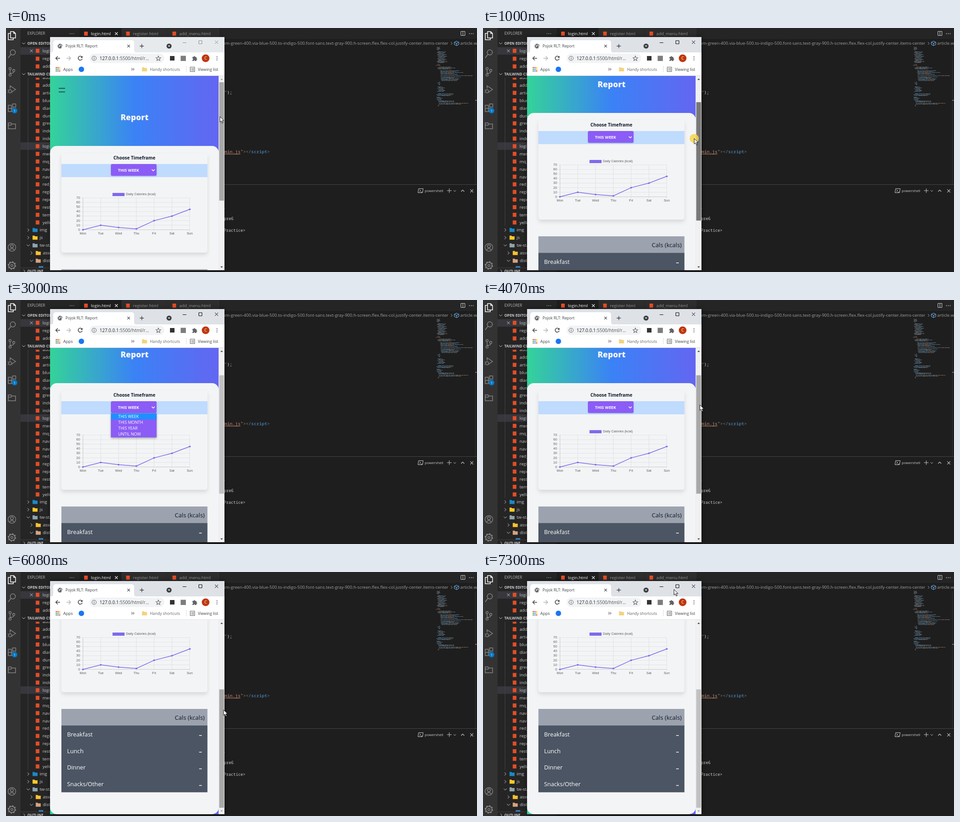
Write an HTML page that moves like this. It is 1037 px wide and 540 px high and loops after 8000 ms.

```html
<!DOCTYPE html>
<html lang="en">
<head>
<meta charset="utf-8">
<title>Report page</title>
<style>
html, body { margin: 0; width: 100%; height: 100%; overflow: hidden; background: #1e1e1e; }
svg { display: block; width: 100%; height: 100%; font-family: "Open Sans", "Noto Sans", sans-serif; }
text { white-space: pre; }
.mono { font-family: "Noto Sans Mono", "DejaVu Sans Mono", monospace; }
.chart { font-family: "Liberation Sans", Arial, sans-serif; }
.card { filter: drop-shadow(0 5px 4px rgba(0,0,0,.11)); }
.btn { filter: drop-shadow(0 1px 1px rgba(0,0,0,.18)); }
.menu { filter: drop-shadow(0 2px 2px rgba(0,0,0,.35)); }
</style>
</head>
<body>
<svg id="stage" viewBox="0 0 1037 540" xmlns="http://www.w3.org/2000/svg"></svg>
<script>
const stage = document.getElementById('stage');
const esc = s => s.replace(/&/g, '&amp;').replace(/</g, '&lt;').replace(/>/g, '&gt;');
const rect = (x, y, w, h, fill, more = '') =>
  `<rect x="${x}" y="${y}" width="${w}" height="${h}" fill="${fill}" ${more}/>`;
const circle = (x, y, r, fill, more = '') => `<circle cx="${x}" cy="${y}" r="${r}" fill="${fill}" ${more}/>`;
const line = (d, stroke, width = 1, more = '') =>
  `<path d="${d}" fill="none" stroke="${stroke}" stroke-width="${width}" ${more}/>`;
// y is the vertical middle of the capitals
const text = (x, y, s, size, fill, more = '') =>
  `<text x="${x}" y="${y + size * .36}" font-size="${size}" fill="${fill}" ${more}>${esc(s)}</text>`;
const group = (body, more = '') => `<g ${more}>${body}</g>`;
const cross = (x, y, r, color, w = 1) =>
  line(`M${x - r} ${y - r}l${2 * r} ${2 * r}m0 ${-2 * r}l${-2 * r} ${2 * r}`, color, w);
const chevron = (x, y, open, color, r = 3.4) => line(open
  ? `M${x - r} ${y - r / 2}l${r} ${r}l${r} ${-r}`
  : `M${x - r / 2} ${y - r}l${r} ${r}l${-r} ${r}`, color);
const dots = (x, y, dx, dy, color, r = 1) =>
  [-1, 0, 1].map(i => circle(x + i * dx, y + i * dy, r, color)).join('');
const bold = 'font-weight="700"', end = 'text-anchor="end"', mid = 'text-anchor="middle"';

function activityBar() {
  const g = '#858585';
  return rect(0, 0, 32, 540, '#333333') +
    line('M10 8h7l4 4v10H10zM17 8v4h4M10 12H5v14h11v-4', '#fff', 1.5) +
    circle(15, 54, 5.7, 'none', `stroke="${g}" stroke-width="1.5"`) + line('M11 58L5 66', g, 1.6) +
    [[9, 90], [9, 104], [17, 94]].map(p => circle(p[0], p[1], 2.5, 'none', `stroke="${g}" stroke-width="1.3"`)).join('') +
    line('M9 92.5v9M17 96.5q0 4-8 4', g, 1.4) +
    line('M9 134v-6l12 8-9 6', g, 1.5) + circle(9, 140, 3.5, 'none', `stroke="${g}" stroke-width="1.4"`) +
    line('M3.5 137h2M3.5 143l2-1.5M14.5 143l-2-1.5', g) +
    line('M5 171h7v14H5zM5 178h14v7H12M14.5 168h7v7h-7z', g, 1.4) +
    circle(19, 183, 6, '#007acc') + text(19, 183, '1', 7.5, '#fff', mid) +
    line('M5 223v-13h6l2 2.5h8V223zM5 215h6l2-2.5', g, 1.5) +
    circle(13, 485.5, 8.5, 'none', `stroke="${g}" stroke-width="1.4"`) +
    circle(13, 483, 3.2, 'none', `stroke="${g}" stroke-width="1.4"`) + line('M7.5 492q5.5-8 11 0', g, 1.4) +
    circle(13, 525.5, 6.8, 'none', `stroke="${g}" stroke-width="1.8"`) +
    circle(13, 525.5, 8.2, 'none', `stroke="${g}" stroke-width="2" stroke-dasharray="3.2 3.24"`) +
    circle(13, 525.5, 2.4, 'none', `stroke="${g}" stroke-width="1.4"`);
}

const fileIcon = (x, y) => rect(x - 4, y - 4.5, 8, 9, '#e44d26');
const folder = (x, y, color) => `<path d="M${x - 5.5} ${y - 4.5}h4l1.5 1.5h5.5v7.5h-11z" fill="${color}"/>`;

function sidebar() {
  const c = '#cccccc', step = 16.87;
  const row = (y, name) => fileIcon(69.5, y) + text(80.5, y, name, 9.5, c);
  const files = ['add_food', 'add_menu', 'article', 'blue', 'diary', 'dummy', 'green', 'index', 'index2', 'login', 'menu',
    'mq_test', 'navbar', 'navbar2', 'red_box', 'register', 'report', 'restaurant', 'template', 'yellow'];
  const dirs = [[447, 0, 0, '#1e88c8', 'img'], [464, 0, 0, '#ffca28', 'js'], [481, 0, 1, '#90a4ae', 'tw-starter'],
    [498, 7, 0, '#fbc02d', 'assets'], [515, 7, 1, '#d7a27c', 'dist']];
  return rect(32, 0, 130, 540, '#252526') +
    text(47, 12, 'EXPLORER', 8.1, '#bbbbbb') + dots(145, 12.5, 4, 0, c, .8) +
    rect(32, 42.5, 130, 16.5, '#37373d') + rect(32, 253, 130, 16.5, '#37373d') +
    files.map((f, i) => row(109.8 + i * step, f + '.html')).join('') +
    line('M48.5 110V438', '#454545') +
    rect(32, 94, 130, 16, '#252526') +
    chevron(39, 34, true, c) + text(47, 34, 'OPEN EDITORS', 8, c, bold) +
    cross(56, 50.5, 3, c) + row(50.5, 'login.html') + row(68, 'register.html') + row(85, 'add_menu.html') +
    chevron(39, 102, true, c) + text(47, 102, 'TAILWIND CSS', 8, c, bold) +
    dirs.map(([y, dx, open, color, name]) => chevron(49 + dx, y, open, c) +
      folder(64 + dx, y, color) + text(74 + dx, y, name, 9.5, c)).join('') +
    rect(72, 527, 10, 4, '#2f7fc0') +
    rect(32, 530.5, 130, 10, '#252526') + rect(32, 530.5, 130, 1, '#454545') +
    chevron(40, 538, false, c) + text(47, 538.5, 'OUTLINE', 8, c, bold);
}

function minimap() {
  let seed = 11, out = '';
  const rnd = () => (seed = seed * 16807 % 2147483647) / 2147483647;
  const tones = ['#456f90', '#788f9c', '#8d6a56', '#666f78', '#4f8096'];
  const blocks = [[42, 50, 948, 9], [52, 77, 949, 23], [80, 84, 947, 10], [86, 92, 950, 46], [94, 104, 954, 54],
    [105, 107, 955, 76], [108, 118, 957, 46], [119, 126, 950, 8], [130, 141, 949, 20], [145, 150, 948, 38],
    [153, 160, 948, 14], [161, 165, 949, 50], [166, 169, 950, 83], [170, 174, 948, 6]];
  for (const [top, bottom, left, span] of blocks)
    for (let y = top; y < bottom; y += 2) {
      let x = left + Math.floor(rnd() * 3) * 1.5;
      const stop = Math.min(1032, left + span * (.6 + .4 * rnd()));
      while (x < stop) {
        const w = Math.min(stop - x, 2 + rnd() * 8);
        out += rect(x.toFixed(1), y, w.toFixed(1), 1, tones[Math.floor(rnd() * 5)]);
        x += w + .8;
      }
    }
  return out;
}

function editor() {
  const c = '#cccccc', grey = '#a0a0a0';
  const tab = (x, w, name, on) => rect(x, 0, w, 24, on ? '#1e1e1e' : '#2d2d2d') + fileIcon(x + 14, 12.5) +
    text(x + 25, 12.5, name, 9.4, on ? '#fff' : '#969696');
  const span = (s, fill) => `<tspan fill="${fill}">${esc(s)}</tspan>`;
  return rect(162, 0, 875, 540, '#1e1e1e') + rect(162, 0, 875, 24, '#252526') +
    tab(162, 92, 'login.html', true) + cross(243, 12.5, 3.2, '#fff', 1.2) +
    tab(254.5, 101.5, 'register.html') + tab(356.5, 113.5, 'add_menu.html') +
    line('M1001.5 7.5h9v9h-9zM1006 7.5v9', c) + dots(1024.5, 12.5, 4, 0, c, .9) +
    text(974, 34, 'from-green-400.via-blue-500.to-indigo-500.font-sans.text-gray-900.h-screen.flex.flex-col.justify-center.items-center', 9.5, grey, end) +
    chevron(981, 34, false, grey, 3) +
    line('M987 31.5l5-2.5 5 2.5v5l-5 2.5-5-2.5zM987 31.5l5 2.5 5-2.5M992 34v5', '#75beff') +
    text(1000, 34, 'article.w-full', 9.5, grey) +
    `<g class="mono" font-size="9.8"><text x="480.5" y="146">${span('"', '#ce9178') + span(');', '#d4d4d4')}</text>` +
    `<text x="481" y="276.5">${span('min.js"', '#ce9178') + span('></', '#808080') + span('script', '#569cd6') + span('>', '#808080')}</text></g>` +
    rect(481, 278.5, 35, 1, '#ce9178') +
    minimap() + rect(1033, 43, 1, 303, '#333') + rect(1033, 159.5, 4, 1.2, '#a0a0a0') +
    rect(162, 346, 875, 1, '#454545') +
    line('M908.5 355.5h10l-1.5 9h-10zM910.5 357.5l2.5 2.5-3 2.5M913.5 363h3', c) +
    text(922, 360.5, 'powershell', 8, c) + line('M971 360h10M976 355v10', c) + chevron(988, 360.5, true, c, 2.6) +
    line('M1002 362l3.5-3.5 3.5 3.5', c, 1.2) + cross(1025.5, 360.5, 3.3, c, 1.1) +
    group(text(483, 399, '-', 8.8, c, end) + text(501, 421.5, 'pre6', 8.8, c, end) +
      text(527, 448, 'Practice>', 8.8, c, end), 'class="mono"');
}

function browser() {
  const c = '#5f6368', ink = '#3c4043';
  const apps = ['#ea4335', '#ea4335', '#fbbc04', '#34a853', '#4285f4', '#fbbc04', '#34a853', '#4285f4', '#ea4335'];
  return rect(97, 20, 384, 516, '#000', 'id="shadow" style="filter:blur(5px)"') +
    rect(97, 20, 384, 516, '#fff') + rect(97, 20, 384, 34, '#dee1e6', 'id="strip"') +
    '<path d="M99 54q5 0 5-5V33q0-6 6-6h166q6 0 6 6v16q0 5 5 5z" fill="#fff"/>' +
    circle(119, 40, 5.3, c) + line('M115 37.5q3 0 3.5 2t-3 2M121 36q-1 2 .5 3t2 2-2 2.5', '#fff', 1.2) +
    text(131, 40, 'Pojok RLT: Report', 8.6, ink) + cross(270, 40, 2.8, ink, 1.2) +
    line('M294.5 40h9M299 35.5v9', ink, 1.3) + circle(359, 40, 5.6, ink) + '<path d="M356.5 38.8h5l-2.5 3z" fill="#fff"/>' +
    group('<path d="M389 32.5h8M424.5 28h7v7h-7zM460 28l7 7m0-7l-7 7"/>', 'id="controls" fill="none" stroke="#000"') +
    line('M119 67h-9.5M114 62.5l-4.5 4.5 4.5 4.5', ink, 1.4) +
    line('M133 67h9.5M138 62.5l4.5 4.5-4.5 4.5', '#b3b5b8', 1.4) +
    line('M167 64a4.5 4.5 0 1 0 .8 4', ink, 1.5) + `<path d="M168.5 61.5v4.5h-4.5z" fill="${ink}"/>` +
    rect(184, 56.5, 164.5, 21, '#f1f3f4', 'rx="10.5"') +
    circle(194, 67, 4.8, 'none', `stroke="${c}"`) + rect(193.4, 66, 1.2, 3.5, c) + rect(193.4, 64, 1.2, 1.2, c) +
    `<text x="206" y="70.6" font-size="10" fill="#202124">127.0.0.1<tspan fill="#4d5156">:5500/html/r...</tspan></text>` +
    line('M335.5 62l1.5 3.5 3.7.3-2.8 2.5.9 3.7-3.3-2-3.3 2 .9-3.7-2.8-2.5 3.7-.3z', c, 1.1) +
    rect(361, 62, 10, 10, '#333') + rect(384.5, 61.5, 11.5, 11.5, '#7d7d7d') +
    `<path d="M410.5 64h2.5a1.7 1.7 0 0 1 3.4 0h2.8v3a1.7 1.7 0 0 1 0 3.4v2.6h-3a1.5 1.5 0 0 0-3 0h-2.7v-2.8a1.5 1.5 0 0 0 0-3z" fill="${c}"/>` +
    circle(439.5, 67, 8.5, '#bf360c') + text(439.5, 67, 'C', 9, '#fff', mid) + dots(464.5, 67, 0, 3.7, c, 1.1) +
    apps.map((a, i) => rect(109.5 + i % 3 * 3.7, 86.5 + Math.floor(i / 3) * 3.7, 2.5, 2.5, a)).join('') +
    text(126, 91.5, 'Apps', 9, ink) + circle(166, 91.5, 6, '#1877f2') +
    line('M276 88.5l2.5 2.7-2.5 2.7M279.5 88.5l2.5 2.7-2.5 2.7', c, 1.1) +
    folder(305, 91.5, '#f3d27c') + text(317, 91.5, 'Handy shortcuts', 8.65, c) +
    rect(396.5, 84, 1, 14, '#dadce0') +
    line('M405.5 86.5h10v10h-10zM407 89.5h1.5M409.5 89.5h4.5M407 91.7h1.5M409.5 91.7h4.5M407 94h1.5M409.5 94h4.5', c) +
    text(422.5, 91.5, 'Viewing list', 8.65, ink) + rect(97, 105, 384, 1, '#dcdfe3');
}

function chart() {
  const purple = '#8069ec', px = i => 169.5 + i * 39.17, py = v => 446.5 - v * 1.007;
  const days = ['Mon', 'Tue', 'Wed', 'Thu', 'Fri', 'Sat', 'Sun'], kcal = [0, 10, 5, 2, 20, 30, 45];
  const label = (x, y, s, more = '') => `<text transform="translate(${x} ${y + 2.2}) scale(1 .85)" ${more}>${s}</text>`;
  let grid = '', labels = '';
  for (let v = 0; v <= 70; v += 10) {
    grid += line(`M165.5 ${py(v)}H404.5`, v ? '#e1e2e5' : '#c4c5c8', .9);
    labels += label(163, py(v), v, end);
  }
  days.forEach((d, i) => {
    grid += line(`M${px(i)} ${py(70)}V450`, i ? '#dedfe2' : '#c4c5c8', .9);
    labels += label(px(i), 455, d, mid);
  });
  return grid + rect(234.5, 365, 26.5, 7, purple) +
    group(labels + label(264, 368, 'Daily Calories (kcal)'), 'class="chart" font-size="7.4" fill="#5c5c5c"') +
    line('M' + kcal.map((v, i) => `${px(i)} ${py(v)}`).join('L'), purple, 1.5) +
    kcal.map((v, i) => `<ellipse cx="${px(i)}" cy="${py(v)}" rx="2.2" ry="1.8" fill="${purple}"/>`).join('');
}

function page() {
  const meals = ['Breakfast', 'Lunch', 'Dinner', 'Snacks/Other'];
  const options = ['THIS WEEK', 'THIS MONTH', 'THIS YEAR', 'UNTIL NOW'];
  return rect(97, 106, 371.5, 662, 'url(#sky)') +
    line('M116 133.5h14M116 141.5h14', '#1f2937', 1.3) +
    text(283, 198, 'Report', 17.6, '#f3f4f6', mid + ' font-weight="800"') +
    rect(97, 261, 371.5, 506, '#f3f4f6', 'rx="15"') +
    rect(122, 277, 321.5, 220, '#f3f4f6', 'rx="5" class="card"') +
    text(282.7, 287.5, 'Choose Timeframe', 9.9, '#111827', mid + ' ' + bold) +
    rect(122, 301, 321.5, 29, '#bfdbfe') +
    rect(231, 301, 100.5, 26, '#8b5cf6', 'rx="3" class="btn"') +
    text(246.5, 314.5, 'THIS WEEK', 8.9, '#fff', bold) +
    line('M321 313l3.2 3.2 3.2-3.2', '#fff', 1.6) +
    chart() +
    rect(122, 534, 321.5, 37, '#9ca3af') + rect(122, 570.7, 321.5, 147.8, '#4b5563') +
    text(437.5, 553, 'Cals (kcals)', 13.1, '#111827', end) +
    meals.map((m, i) => text(134.5, 590 + i * 36.9, m, 12.8, '#fff') +
      rect(425.3, 592 + i * 36.9, 5.7, 1.5, '#fff')).join('') +
    group(rect(231, 327.5, 100.5, 53.5, '#8b5cf6', 'class="menu"') + rect(231, 328, 100.5, 13.3, '#1e90ff') +
      options.map((o, i) => text(247, 335 + i * 13, o, 9, '#fff')).join(''), 'id="menu"');
}

stage.innerHTML =
  `<defs><linearGradient id="sky"><stop stop-color="#34d399"/><stop offset=".5" stop-color="#3b82f6"/><stop offset="1" stop-color="#6366f1"/></linearGradient>
  <clipPath id="view">${rect(97, 106, 371.5, 430, '#000')}</clipPath></defs>` +
  editor() + sidebar() + activityBar() + browser() +
  group(group(page(), 'id="page"'), 'clip-path="url(#view)"') +
  rect(468.5, 106, 12.5, 430, '#f1f1f1') + rect(469.5, 120, 10.5, 262, '#c1c1c1', 'id="thumb"') +
  '<path id="up" d="M472 115l2.8-3.5 2.8 3.5z"/><path id="down" d="M472 527.5l2.8 3.5 2.8-3.5z"/>' +
  circle(0, 0, 10, '#f6d54a', 'id="press" fill-opacity=".85"') +
  '<path id="cursor" d="M0 0V12.3L2.9 9.7 5 14.6 7 13.8 5 9H8.8Z" fill="#fff" stroke="#000" stroke-width=".9"/>';

const $ = id => document.getElementById(id);
const set = (id, attrs) => { for (const k in attrs) $(id).setAttribute(k, attrs[k]); };
const show = (id, on) => set(id, { visibility: on ? 'visible' : 'hidden' });

const LOOP = 8000, MAX = 231;
const idle = '#c1c1c1', hover = '#a8a8a8', drag = '#787878';
const scenes = [
  { at: 0, scroll: 0, thumb: hover, cursor: [471, 196], blurred: true },
  { at: 1000, scroll: 73, thumb: drag, cursor: [465, 244.5], press: true },
  { at: 1990, scroll: 77, thumb: idle, cursor: [314, 235], menu: true },
  { at: 3000, scroll: 77, thumb: idle, menu: true },
  { at: 4070, scroll: 77, thumb: hover, cursor: [477.5, 232] },
  { at: 5080, scroll: 160, thumb: idle, cursor: [432, 259] },
  { at: 6080, scroll: MAX, thumb: hover, cursor: [479, 305] },
  { at: 7300, scroll: MAX, thumb: idle, cursor: [420.5, 38.5] }
];

function draw(t) {
  const s = scenes.filter(v => v.at <= t).pop();
  set('page', { transform: `translate(0 ${-s.scroll})` });
  set('thumb', { y: 120 + s.scroll * .605, fill: s.thumb });
  set('up', { fill: s.scroll ? '#505050' : '#a3a3a3' });
  set('down', { fill: s.scroll < MAX ? '#505050' : '#a3a3a3' });
  set('strip', { fill: s.blurred ? '#e7eaed' : '#dee1e6' });
  set('controls', { stroke: s.blurred ? '#8a8c8f' : '#000' });
  set('shadow', { opacity: s.blurred ? .25 : .5 });
  show('menu', s.menu);
  show('cursor', s.cursor);
  show('press', s.press);
  if (s.cursor) {
    const move = { transform: `translate(${s.cursor})` };
    set('cursor', move);
    set('press', move);
  }
}

const start = performance.now();
function tick() {
  draw((performance.now() - start) % LOOP);
  requestAnimationFrame(tick);
}
tick();
</script>
</body>
</html>
```
